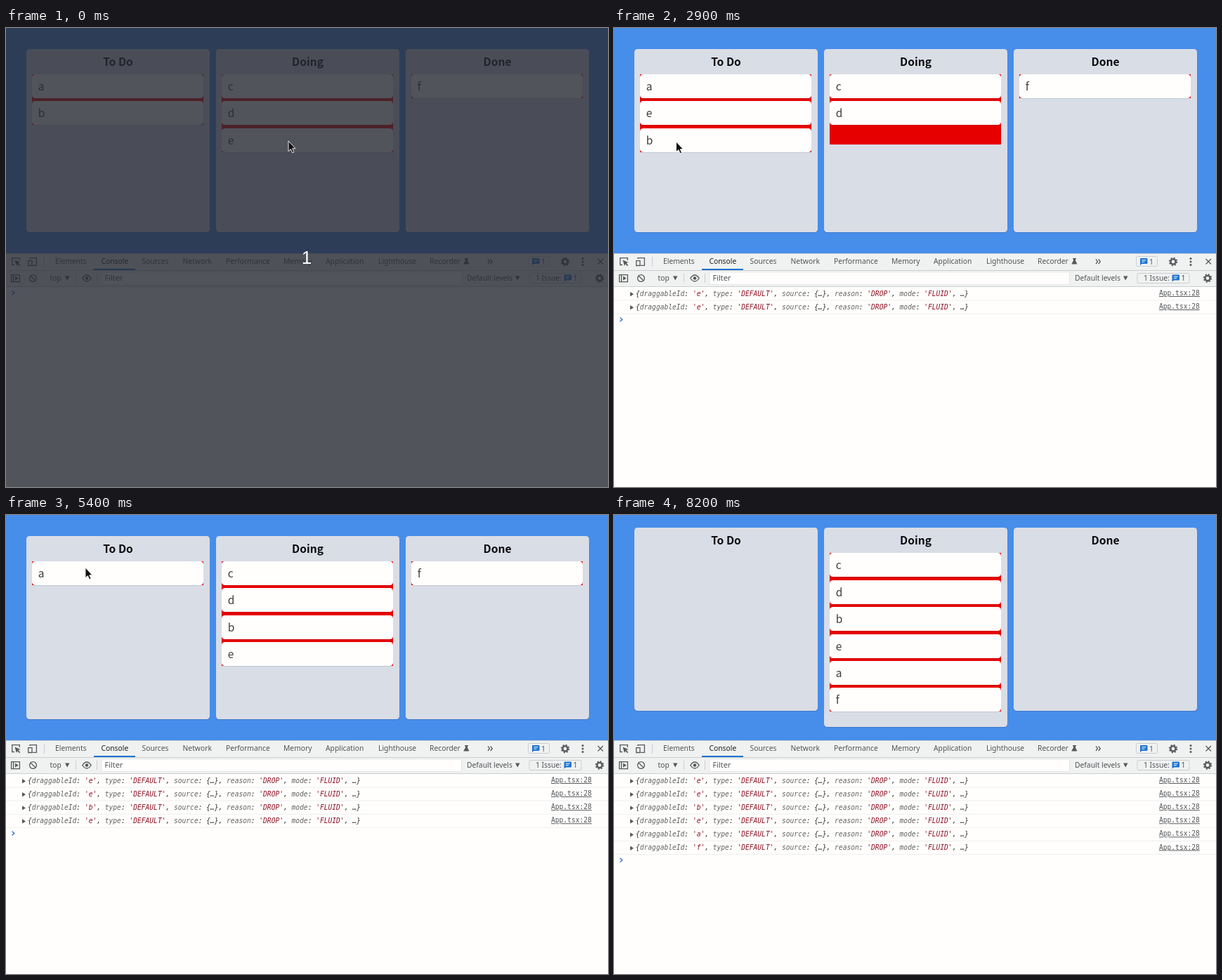
An HTML page that plays this animation: 857 px wide and 654 px high, repeating every 8.8 s.

```html
<!DOCTYPE html>
<html lang="en">
<head>
<meta charset="utf-8">
<title>Task board</title>
<style>
html, body { margin: 0; height: 100%; overflow: hidden; background: #fffefd; }
svg { display: block; }
text { fill: #515457; font: 10.3px "Noto Sans", "Open Sans", sans-serif; }
.head { font: 700 15.6px "Noto Sans CJK JP", "Noto Sans CJK SC", "Noto Sans", sans-serif; fill: #0a0b0d; text-anchor: middle; }
.card text { font: 300 15.5px "Noto Sans CJK JP", "Noto Sans CJK SC", "Noto Sans", sans-serif; fill: #3c3c3c; }
.log { font: italic 9.6px "DejaVu Sans Mono", monospace; fill: #303030; }
.link { font: 9.6px "DejaVu Sans Mono", monospace; text-decoration: underline; }
.key { fill: #606060; }
.str { fill: #8e1022; }
.ico { fill: none; stroke: #56595c; stroke-width: 1.3; }
.solid { fill: #56595c; }
.line { fill: none; stroke: #cacdd0; }
.blue { fill: #1f73cf; }
</style>
</head>
<body>
<svg width="857" height="654" viewBox="0 0 857 654">
  <rect width="857" height="654" fill="#fffefd"/>
  <rect width="857" height="321" fill="#478dea"/>
  <g id="board"></g>

  <rect y="321" width="857" height="47" fill="#f0f2f1"/>
  <path class="line" d="M0 321.5H857M0 345.5H857M0 368.5H857M54.5 326V340M99.5 350V363M129.5 350V363"/>
  <g id="tabs"></g>
  <rect x="125" y="343" width="59" height="2" class="blue"/>
  <path class="ico" d="M12 337.5H8.7V327.7H19.3V331M34 329V327.6H43.4V338.4H38M31.7 331.7H37V338.5H31.7Z"/>
  <path class="solid" d="M12.5 330.5L20.5 334L17.5 335L20.3 338L19 339.2L16.2 336.3L14.8 339Z"/>
  <path class="solid" d="M653 328H658V329.2H657V331.6L659.4 336.6H651.2L653.9 331.6V329.2H653Z"/>
  <path class="ico" d="M686 329.5L688.5 332.7L686 336M689.7 329.5L692.2 332.7L689.7 336" stroke-width="1.1"/>
  <g class="solid"><circle cx="821" cy="328.6" r="1.5"/><circle cx="821" cy="333" r="1.5"/><circle cx="821" cy="337.4" r="1.5"/></g>
  <path class="ico" d="M842.5 329L850 336.5M850 329L842.5 336.5"/>
  <rect class="line" x="743.5" y="325.5" width="30" height="14" rx="2"/>
  <rect class="line" x="745" y="349.5" width="74" height="14" rx="2"/>
  <g id="bubbles"></g>
  <g id="gears"></g>

  <path class="ico" d="M7.6 351.6H19.4V361.6H7.6ZM10.6 351.6V361.6"/>
  <path class="solid" d="M13 353.4L17.6 356.6L13 359.8Z"/>
  <circle class="ico" cx="38.5" cy="356.5" r="4.9"/><path class="ico" d="M35 353L42 360"/>
  <path class="solid" d="M84 353.5H90.5L87.2 359.5ZM725 353.5H731.5L728.2 359.5Z"/>
  <path class="ico" d="M108.7 356.5Q115 347.5 121.3 356.5Q115 365.5 108.7 356.5Z"/>
  <circle class="solid" cx="115" cy="356.5" r="2.3"/>
  <rect x="136" y="348" width="512.5" height="17.5" fill="#fffefd" stroke="#e2e5e6" stroke-width=".8"/>
  <text x="140.5" y="360" style="font-size:10.9px">Filter</text>
  <text x="62.5" y="360">top</text>
  <text x="656" y="360">Default levels</text>
  <text x="754" y="360">1 Issue:</text>
  <text x="762" y="336.5">1</text>
  <text x="807.5" y="360">1</text>

  <g id="rows"></g>
  <path id="prompt" fill="none" stroke="#3a78d0" stroke-width="1.4" d="M8.5 374.3L11.8 377.2L8.5 380.1"/>

  <g id="dim">
    <rect width="857" height="654" fill="#272a34" opacity=".8"/>
    <text x="428" y="336" text-anchor="middle" style="font:26px 'Liberation Sans',Arial,sans-serif;fill:#fff">1</text>
  </g>
  <g id="cursor">
    <path id="arrow" fill="#111" stroke="#fff" stroke-width=".9" d="M0 0V14.6L3.4 11.6L5.7 16.8L8 15.8L5.8 10.7H10Z"/>
    <g id="hand" fill="#fff" stroke="#111" stroke-width="1.2">
      <path d="M-4-1V-4a1.5 1.5 0 0 1 3-.6a1.5 1.5 0 0 1 3 0a1.5 1.5 0 0 1 2.7 .6a1.3 1.3 0 0 1 2 .9V2Q6.6 4 5 6.5H-3Q-4 4-6.3 1.5Q-7-.8-4-1Z"/>
      <path stroke-width=".8" d="M-1-4.6V-2.5M2-4.6V-2.5M4.7-4V-2.3M-4-1V1"/>
    </g>
  </g>
</svg>
<script>
const LOOP = 8800, STEP = 100, PITCH = 38.4, CARD_H = 34, CARD_W = 244, ROW = 19.1;

// columns before the first move and after each one
const lists = [
  ['ab', 'cde', 'f'], ['ab', 'ced', 'f'], ['aeb', 'cd', 'f'], ['ae', 'cdb', 'f'],
  ['a', 'cdbe', 'f'], ['', 'cdbea', 'f'], ['', 'cdbeaf', '']
];
// card, then times: grabbed, over its new place, released, landed
const moves = [
  ['e', 200, 550, 950, 1450],
  ['e', 1690, 2000, 2350, 2874],
  ['b', 2950, 3300, 3650, 4120],
  ['e', 4250, 4420, 4650, 5060],
  ['a', 5450, 5680, 5990, 6450],
  ['f', 6700, 6960, 7280, 7760]
].map(([card, grab, over, drop, land]) => ({ card, grab, over, drop, land }));
// pointer: time, x, y
const path = [
  [0, 402, 161], [200, 406.3, 172.6], [500, 388, 151], [900, 410, 134], [1400, 410, 134],
  [1700, 400, 122], [1850, 400, 122], [2200, 134, 119], [2350, 134, 119], [2800, 88.5, 162],
  [2950, 88.5, 162], [3600, 368, 157], [3650, 368, 157], [4150, 150, 125.5], [4250, 150, 125.5],
  [4650, 423, 200], [5000, 113, 75], [5450, 113, 75], [5980, 386, 227], [6380, 647, 73],
  [6700, 647, 73], [7250, 380, 252], [7330, 380, 252], [8200, 400, -20], [LOOP, 400, -20]
];

const $ = id => document.getElementById(id);
const mix = (a, b, p) => a + (b - a) * p;
const clamp = u => Math.min(1, Math.max(0, u));

function bezier(x1, y1, x2, y2) {
  const at = (a, b, s) => 3 * a * s * (1 - s) ** 2 + 3 * b * s * s * (1 - s) + s ** 3;
  return u => {
    if (u <= 0 || u >= 1) return clamp(u);
    let lo = 0, hi = 1;
    for (let i = 0; i < 24; i++) {
      const s = (lo + hi) / 2;
      if (at(x1, x2, s) < u) lo = s; else hi = s;
    }
    return at(y1, y2, lo);
  };
}
const shift = bezier(.2, 0, 0, 1), settle = bezier(.2, 1, .1, 1);
const shifted = (t, start) => shift((t - start) / 200);

function pointer(t) {
  const i = Math.max(1, path.findIndex(p => p[0] >= t));
  const [a, b] = [path[i - 1], path[i]];
  const u = clamp((t - a[0]) / (b[0] - a[0])), p = u * u * (3 - 2 * u);
  return [mix(a[1], b[1], p), mix(a[2], b[2], p)];
}

function listHeight(col, t) {
  let n = lists[0][col].length;
  moves.forEach((m, k) => {
    const d = lists[k + 1][col].length - lists[k][col].length;
    n += d * shifted(t, d > 0 ? m.over : m.land);
  });
  return Math.max(0, n * PITCH - PITCH + CARD_H);
}
const colHeight = (col, t) => Math.max(261, 58 + listHeight(col, t));
const boardTop = t => 160.3 - colHeight(1, t) / 2;

function place(card, k) {
  const col = lists[k].findIndex(s => s.includes(card));
  return [col, lists[k][col].indexOf(card)];
}
const slotXY = ([col, i], t) => [37 + 270 * col, boardTop(t) + 36 + PITCH * i];

function cardXY(card, t) {
  let slot = place(card, 0);
  for (let k = 0; k < moves.length; k++) {
    const m = moves[k], next = place(card, k + 1);
    if (t < m.grab) break;
    if (m.card !== card) {
      slot = [next[0], mix(slot[1], next[1], shifted(t, m.over))];
    } else if (t >= m.land) {
      slot = next;
    } else {
      const home = slotXY(slot, m.grab), from = pointer(m.grab), now = pointer(Math.min(t, m.drop));
      const goal = slotXY(next, t), p = settle((t - m.drop) / (m.land - m.drop));
      return home.map((h, i) => mix(h + now[i] - from[i], goal[i], p));
    }
  }
  return slotXY(slot, t);
}

// --- build ---
$('tabs').innerHTML = [['Elements', 70], ['Console', 135.5], ['Sources', 193.5], ['Network', 251.5],
  ['Performance', 313], ['Memory', 395], ['Application', 455], ['Lighthouse', 530], ['Recorder', 603]]
  .map(([s, x]) => `<text x="${x}" y="336.3"${s === 'Console' ? ' style="fill:#222"' : ''}>${s}</text>`).join('');

$('bubbles').innerHTML = [[749, 328], [794.5, 351.5]].map(([x, y]) => `<g transform="translate(${x} ${y})">
  <path class="blue" d="M1 0H9.5Q10.5 0 10.5 1V7Q10.5 8 9.5 8H2.5L0 10V1Q0 0 1 0Z"/>
  <path stroke="#fff" d="M2.3 2.7H8.3M2.3 5.2H6.5"/></g>`).join('');

$('gears').innerHTML = [[796, 333], [845, 356.5]].map(([x, y]) => `<g class="ico" transform="translate(${x} ${y})">
  <circle r="3.6" style="stroke-width:2.4"/><circle r="5.3" style="stroke-width:1.8" stroke-dasharray="2.08"/></g>`).join('');

$('rows').innerHTML = moves.map((m, i) => {
  const text = `{draggableId: '${m.card}', type: 'DEFAULT', source: {…}, reason: 'DROP', mode: 'FLUID', …}`
    .replace(/\w+(?=: )/g, '<tspan class="key">$&</tspan>')
    .replace(/'\w+'/g, '<tspan class="str">$&</tspan>');
  return `<g transform="translate(0 ${i * ROW})"><path class="solid" d="M23 376L28 379.2L23 382.4Z"/>
    <text class="log" x="31" y="381.6">${text}</text><text class="link" x="776" y="381">App.tsx:28</text>
    <path class="edge" stroke="#efefef" d="M0 388H857"/></g>`;
}).join('');

$('board').innerHTML = ['To Do', 'Doing', 'Done'].map((name, i) => `<g class="col" transform="translate(${29 + 270 * i} 0)">
  <rect y=".8" width="261" rx="4.5" fill="#091e42" opacity=".25"/><rect width="261" rx="4.5" fill="#d9dde6"/>
  <text class="head" x="130.5" y="24.2">${name}</text><rect x="8" y="36" width="${CARD_W}" fill="#e60000"/></g>`).join('') +
  [...'abcdef'].map(c => `<g class="card" id="card-${c}">
    <rect y=".8" width="${CARD_W}" height="${CARD_H}" rx="4.5" fill="#091e42" opacity=".15"/>
    <rect width="${CARD_W}" height="${CARD_H}" rx="4.5" fill="#fffefd"/><text x="8.7" y="23.2">${c}</text></g>`).join('');

const cols = [...document.querySelectorAll('.col')];
const rows = [...$('rows').children];
const show = (el, on) => el.style.display = on ? '' : 'none';
const move = (el, x, y) => el.setAttribute('transform', `translate(${x} ${y})`);

function draw(t) {
  const held = moves.find(m => t >= m.grab && t < m.land);
  const dragging = held && t < held.drop;

  cols.forEach((g, i) => {
    move(g, 29 + 270 * i, Math.round(boardTop(t)));
    const [shade, body, list] = g.querySelectorAll('rect');
    shade.setAttribute('height', Math.round(colHeight(i, t)));
    body.setAttribute('height', Math.round(colHeight(i, t)));
    list.setAttribute('height', Math.round(listHeight(i, t)));
  });
  for (const c of 'abcdef') {
    const [x, y] = cardXY(c, t);
    move($('card-' + c), Math.round(x), Math.round(y));
  }
  const top = held && $('card-' + held.card);
  if (top && top !== $('board').lastElementChild) $('board').append(top);

  const n = moves.filter(m => t >= m.land).length;
  rows.forEach((row, i) => {
    show(row, i < n);
    show(row.querySelector('.edge'), n > 1);
  });
  move($('prompt'), 0, n * ROW);

  move($('cursor'), ...pointer(t));
  show($('arrow'), !dragging);
  show($('hand'), dragging);
  show($('dim'), t < STEP);
}

const start = performance.now();
function tick() {
  const t = (performance.now() - start) % LOOP;
  draw(Math.floor(t / STEP) * STEP);
  requestAnimationFrame(tick);
}
tick();
</script>
</body>
</html>
```
